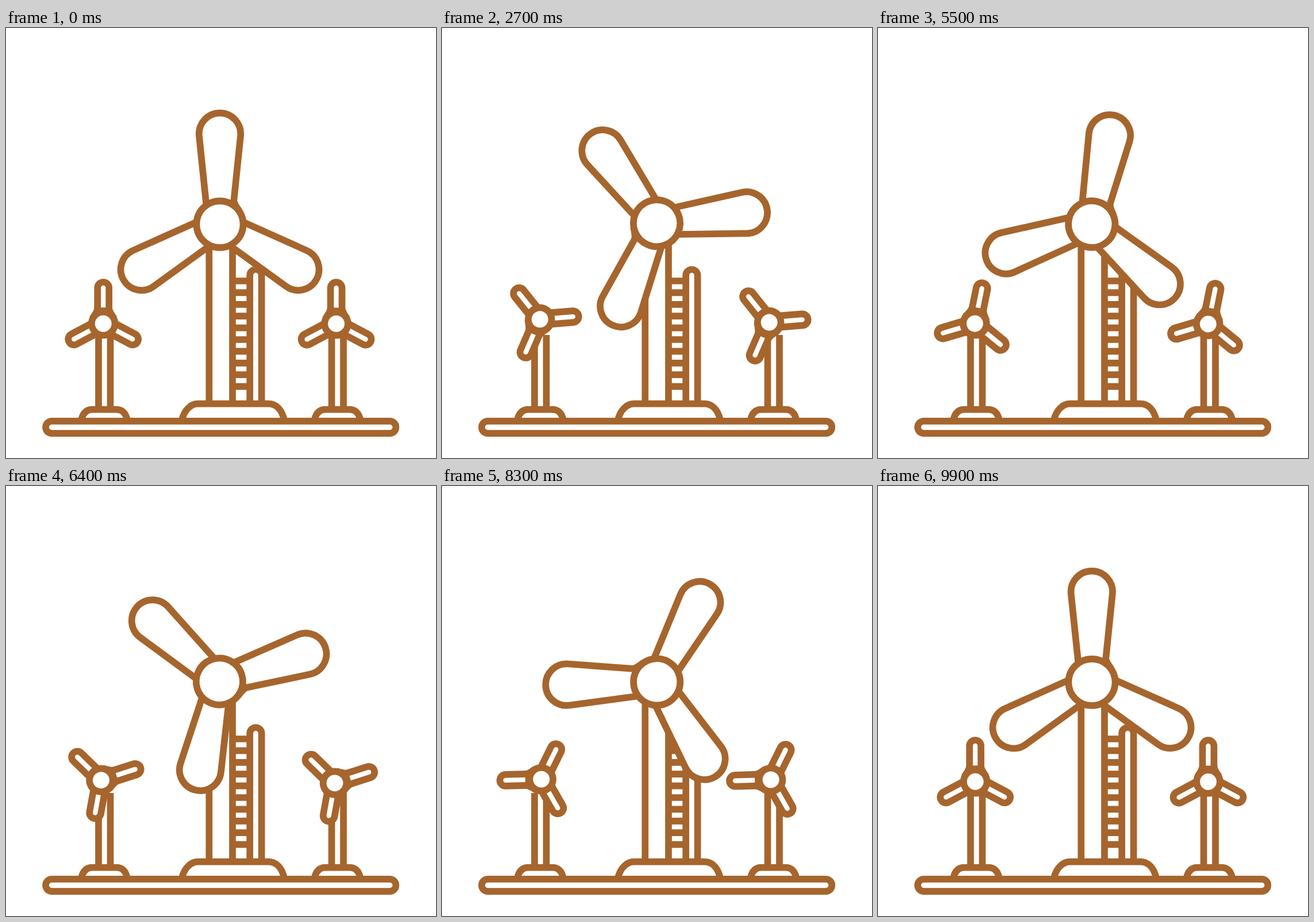
An HTML page that plays this animation: 748 by 748 pixels, repeating every 10000 ms.

```html
<!DOCTYPE html>
<html lang="en">
<head>
<meta charset="utf-8">
<title>Wind turbines</title>
<style>
  html, body { margin: 0; width: 100%; height: 100%; overflow: hidden; background: #fff; }
  svg { display: block; width: 100vw; height: 100vh; }
  .line { fill: #fff; stroke: #a6652d; stroke-width: 11.7; }
  .solid { fill: #a6652d; stroke: none; }
</style>
</head>
<body>
<svg viewBox="0 0 748 748">
  <defs>
    <path id="bigBlade" d="M-23.6-34L-36-153.5A36.2 36.2 0 1 1 36-153.5L23.6-34"/>
    <path id="smallBlade" d="M-10-16V-62.2A10 10 0 0 1 10-62.2V-16"/>
    <g id="bigRotor">
      <use href="#bigBlade"/>
      <use href="#bigBlade" transform="rotate(120)"/>
      <use href="#bigBlade" transform="rotate(240)"/>
      <path class="solid" d="M29-45Q30-38 39-26L28-30Z"/>
      <circle r="40.6"/>
    </g>
    <g id="smallRotor">
      <use href="#smallBlade"/>
      <use href="#smallBlade" transform="rotate(118) translate(0 4.5)"/>
      <use href="#smallBlade" transform="rotate(242) translate(0 4.5)"/>
      <path class="solid" d="M-15.5-28Q-16-23-24-12L0-18L24-12Q16-23 15.5-28Z"/>
      <circle r="20.3"/>
    </g>
    <g id="smallTower">
      <path d="M161 534V665M181.5 534V665"/>
      <path d="M131 682C134 669 141 663.7 150 663.7H192C202 663.7 208 669 211 682"/>
    </g>
  </defs>
  <g class="line">
    <path d="M353.3 370V655M394 370V655"/>
    <path id="rungs"/>
    <path d="M424.2 655V430.2A10.2 10.2 0 0 1 444.6 430.2V655"/>
    <path d="M306 682C310 664 322 653.7 334 653.7H456C470 653.7 480 664 484 682"/>
    <use href="#smallTower"/>
    <use href="#smallTower" x="405.5"/>
    <rect x="69" y="683.9" width="609.3" height="21.2" rx="10.6"/>
    <g id="rotors"></g>
  </g>
</svg>
<script>
  const LOOP = 10000, STEP = 100, TURN = 4970;
  const $ = id => document.getElementById(id);

  $('rungs').setAttribute('d',
    Array.from({ length: 10 }, (_, i) => `M396 ${440 + i * 20.4}H422`).join(''));

  // Each hub sits slightly off its pivot, so the rotors wobble as they turn.
  const rotors = [
    { shape: 'bigRotor', pivot: [372.6, 340.3], hub: [-0.6, 1.1] },
    { shape: 'smallRotor', pivot: [169, 510.4], hub: [0.2, 3.8] },
    { shape: 'smallRotor', pivot: [571.6, 513.8], hub: [2.9, 0.6] }
  ];
  for (const r of rotors) {
    r.node = document.createElementNS('http://www.w3.org/2000/svg', 'use');
    r.node.setAttribute('href', '#' + r.shape);
    $('rotors').append(r.node);
  }

  const ease = p => p * p * (3 - 2 * p);

  function draw(now) {
    const t = Math.floor(now % LOOP / STEP) * STEP;
    const angle = 360 * ease(t / TURN % 1);
    for (const { node, pivot, hub } of rotors)
      node.setAttribute('transform', `translate(${pivot}) rotate(${angle}) translate(${hub})`);
  }

  const start = performance.now();
  function tick() {
    draw(performance.now() - start);
    requestAnimationFrame(tick);
  }
  tick();
</script>
</body>
</html>
```
